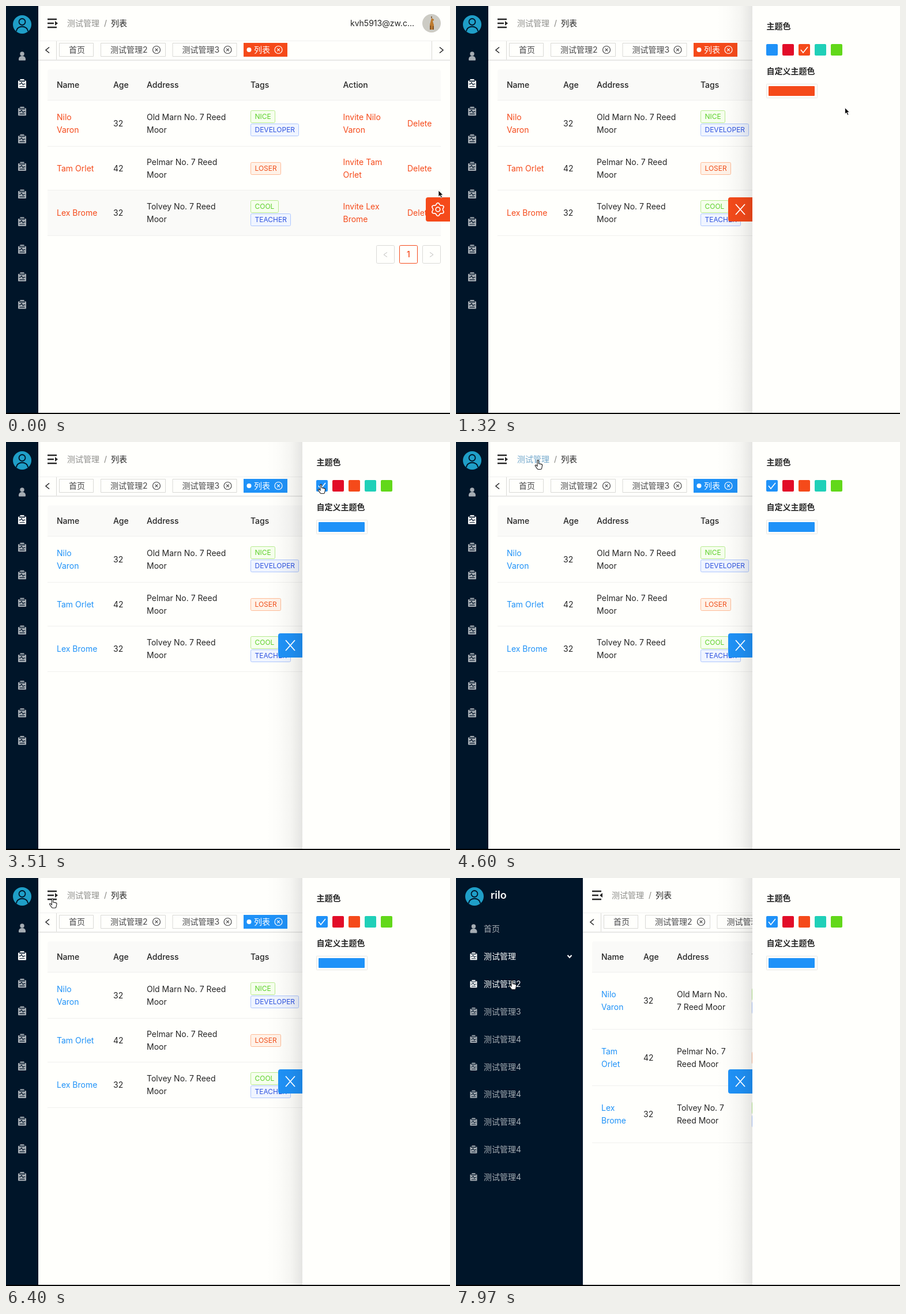
These frames come from a looping animation (770x708 px, 8000 ms). An HTML page with a canvas:

```html
<!DOCTYPE html>
<html lang="zh">
<head>
<meta charset="utf-8">
<style>
html, body { margin: 0; width: 100%; height: 100%; overflow: hidden; background: #fffffc; }
canvas { display: block; }
</style>
</head>
<body>
<canvas id="stage" width="770" height="708"></canvas>
<script>
const ctx = document.getElementById('stage').getContext('2d');
const LOOP = 8000, PAPER = '#fffffc', DARK = '#001529', INK = '#262626';
const LINE = '#f0f0ee', BORDER = '#d9d9d6', BAND = '#fafaf8';
const THEMES = ['#1f92f8', '#e20c28', '#f54a1a', '#20d0b8', '#62d81a'];

const ROWS = [
  { name: 'Nilo Varon', age: 32, address: 'Old Marn No. 7 Reed Moor', tags: ['NICE', 'DEVELOPER'] },
  { name: 'Tam Orlet', age: 42, address: 'Pelmar No. 7 Reed Moor', tags: ['LOSER'] },
  { name: 'Lex Brome', age: 32, address: 'Tolvey No. 7 Reed Moor', tags: ['COOL', 'TEACHER'] },
];
// Row heights and address wrapping for the three table widths
const ROW_HEIGHTS = [[79.5, 76.5, 78.5], [98.5, 77, 78.5], [98.5, 98.5, 98.5]];
const ADDRESS_WORDS = [[5, 4, 4], [4, 3, 3], [3, 3, 3]];
const GREEN = ['#5cd02a', '#f6ffed', '#b7eb8f'];
const BLUE = ['#2f54e0', '#f0f5ff', '#adc6ff'];
const RED = ['#f0501c', '#fff2e8', '#ffbb96'];
const TAGS = {
  NICE: [43, GREEN], DEVELOPER: [84, BLUE], LOSER: [53, RED], COOL: [49, GREEN], TEACHER: [70, BLUE],
};
const MENU = ['首页', '测试管理', '测试管理2', '测试管理3', ...Array(6).fill('测试管理4')];

// Pointer tip: time, x, y
const PATH = [
  [0, 750, 320], [350, 746, 355], [920, 746, 355], [1600, 633, 73], [2250, 633, 73],
  [2760, 546, 73], [3750, 546, 73], [4530, 146, 32], [4600, 142, 31], [4910, 122, 31],
  [5080, 122, 31], [5620, 27, 144], [5930, 27, 144], [6500, 85, 26], [7050, 85, 26],
  [7540, 97, 177], [LOOP, 97, 177],
];
const ARROW_SPANS = [[0, 180], [980, 1500], [3900, 4450], [5150, 5500], [6050, 6400]];

const clamp = v => Math.max(0, Math.min(1, v));
const lerp = (a, b, k) => a + (b - a) * k;
const ramp = (t, start, length) => clamp((t - start) / length);
const during = (t, a, b) => t >= a && t < b;
const fade = (t, a, b) => Math.min(ramp(t, a, 120), 1 - ramp(t, b, 120));

function text(str, x, y, color = INK, size = 14, weight = 400, align = 'left') {
  ctx.font = `${weight} ${size}px Inter, "Noto Sans CJK SC", "Noto Sans CJK", sans-serif`;
  ctx.fillStyle = color;
  ctx.textAlign = align;
  ctx.fillText(str, x, y + size * 0.36);
}
function rect(x, y, w, h, color) {
  ctx.fillStyle = color;
  ctx.fillRect(x, y, w, h);
}
function box(x, y, w, h, radius, fill, stroke) {
  ctx.beginPath();
  ctx.roundRect(x, y, w, h, radius);
  paint(fill, stroke);
}
function circle(x, y, r, fill, stroke, width) {
  ctx.beginPath();
  ctx.arc(x, y, r, 0, 7);
  paint(fill, stroke, width);
}
function paint(fill, stroke, width = 1) {
  if (fill) { ctx.fillStyle = fill; ctx.fill(); }
  if (stroke) { ctx.strokeStyle = stroke; ctx.lineWidth = width; ctx.stroke(); }
}
// SVG path drawn with its origin at x, y
function shape(d, x, y, fill, stroke, width = 1) {
  const path = new Path2D(d);
  ctx.save();
  ctx.translate(x, y);
  if (fill) { ctx.fillStyle = fill; ctx.fill(path); }
  if (stroke) { ctx.strokeStyle = stroke; ctx.lineWidth = width; ctx.stroke(path); }
  ctx.restore();
}
function withAlpha(alpha, draw) {
  if (alpha <= 0) return;
  ctx.save();
  ctx.globalAlpha = alpha;
  draw();
  ctx.restore();
}
function softShadow(blur, color, offset, draw) {
  ctx.save();
  Object.assign(ctx, { shadowBlur: blur, shadowColor: color, shadowOffsetY: offset });
  draw();
  ctx.restore();
}
// Two lines, broken after the given number of words
function wrapped(str, count, x, y, color) {
  const words = str.split(' ');
  const lines = [words.slice(0, count), words.slice(count)].filter(l => l.length);
  lines.forEach((l, i) => text(l.join(' '), x, y + (i - (lines.length - 1) / 2) * 22, color));
}

function userIcon(x, y, color) {
  circle(x, y - 4, 3.7, color);
  box(x - 6, y, 12, 7.5, [5, 5, 1, 1], color);
}
function clipboardIcon(x, y, color, size) {
  ctx.save();
  ctx.translate(x, y);
  ctx.scale(size / 14, size / 14);
  box(-7, -5.5, 14, 13, 1, color);
  rect(-3.5, -8, 7, 2, color);
  shape('M-5 -4.2H5M-5.5 .5H-3L-1 -2L1.5 2L3 .5H5.5M-4.5 4.6H4.5', 0, 0, null, DARK, 1.2);
  ctx.restore();
}
function closeIcon(x, color) {
  circle(x, 76, 6.5, null, color, 1.2);
  shape('M-2.4 -2.4L2.4 2.4M2.4 -2.4L-2.4 2.4', x, 76, null, color, 1.2);
}
function gearIcon(x, y) {
  ctx.beginPath();
  for (let i = 0; i <= 72; i++) {
    const a = i / 72 * Math.PI * 2, r = 9.8 + 1.5 * Math.cos(6 * (a + Math.PI / 2));
    ctx.lineTo(x + r * Math.cos(a), y + r * Math.sin(a));
  }
  paint(null, '#fff', 1.7);
  circle(x, y, 3.8, null, '#fff', 1.7);
}
function tooltip(label, x, y, w, h, up) {
  const fill = up ? '#07090c' : '#404040';
  softShadow(14, 'rgba(0,0,0,.15)', 3, () => box(x, y, w, h, 2, fill));
  shape(up ? 'M-5 0L0 -5L5 0' : 'M-5 0L0 5L5 0', x + w / 2, up ? y : y + h, fill);
  text(label, x + w / 2, y + h / 2, '#fff', 14, 400, 'center');
}

function drawHeader(w, open, theme, t) {
  const x = w + 16;
  shape('M0 1H16M0 8H11M0 15H16', x, 22, null, INK, 2.6);
  shape(open ? 'M18 4V12L13 8Z' : 'M13 4V12L18 8Z', x, 22, INK);
  text('测试管理', w + 50, 30, during(t, 4480, 5080) ? '#72a8cc' : '#8f8f8c');
  text('/', w + 114, 30, '#85857f');
  text('列表', w + 126, 30);
  text('kvh5913@zw.c...', 708, 30, INK, 14, 400, 'right');

  circle(738, 30, 16, '#cccbc4');
  shape('M-3 11V2L0 -9L4 -7V-5L2 -4L4 3V11', 738, 30, '#bd7b30');
  shape('M-2 11V4M3 11V5M0 -9V-12', 738, 30, null, '#6d4520', 1.4);

  rect(w, 60, 770 - w, 1, LINE);
  rect(w, 93, 770 - w, 2, '#e8e8e6');
  rect(w + 31, 61, 1, 32, BORDER);
  rect(738, 61, 1, 32, BORDER);
  shape('M3 -5L-3 0L3 5', w + 16, 76.5, null, INK, 1.5);
  shape('M-3 -5L3 0L-3 5', 755, 76.5, null, INK, 1.5);
  [['首页', 36, 60], ['测试管理2', 108, 113, 205], ['测试管理3', 232.5, 112, 328.5]].forEach(([label, left, width, close]) => {
    box(w + left + .5, 64.5, width - 1, 23, 0, PAPER, BORDER);
    text(label, w + left + 17, 76, '#48484a');
    if (close) closeIcon(w + close, '#48484a');
  });
  rect(w + 356, 64, 76, 24, theme);
  circle(w + 365.5, 76, 4, '#fff');
  text('列表', w + 374, 76, '#fff');
  closeIcon(w + 416.5, '#fff');
}

function drawTable(w, mode, at, theme, t) {
  const left = w + 16, width = 754 - left;
  const col = { name: w + 32, age: w + at(130, 115, 105), address: w + at(188, 173, 163), tags: w + at(368, 321, 293) };
  box(left, 110, width, 54, [4, 4, 0, 0], BAND);
  rect(left, 163, width, 1, LINE);
  [['Name', col.name], ['Age', col.age], ['Address', col.address], ['Tags', col.tags], ['Action', 584.5]]
    .forEach(([label, x]) => text(label, x, 137, INK, 14, 500));

  let top = 164;
  ROWS.forEach((row, i) => {
    const height = ROW_HEIGHTS[mode][i], mid = top + height / 2;
    if (i === 2 && t < 300) rect(left, top, width, height, BAND);
    rect(left, Math.round(top + height) - 1, width, 1, LINE);
    wrapped(row.name, mode || i === 0 ? 1 : 2, col.name, mid, theme);
    text(row.age, col.age, mid);
    wrapped(row.address, ADDRESS_WORDS[mode][i], col.address, mid);
    row.tags.forEach((tag, k) => {
      const [tagWidth, [ink, fill, edge]] = TAGS[tag];
      const y = Math.round(mid - 11 + (k - (row.tags.length - 1) / 2) * 23);
      box(Math.round(col.tags) + .5, y + .5, tagWidth - 1, 21, 2, fill, edge);
      text(tag, col.tags + 7.5, y + 11, ink, 12);
    });
    wrapped('Invite ' + row.name, 2, 584.5, mid, theme);
    text('Delete', 696, mid, theme);
    top += height;
  });

  const y = Math.round(top) + 16.5;
  [642, 682, 722].forEach((x, i) => box(x + .5, y, 31, 31, 2, PAPER, i === 1 ? theme : BORDER));
  text('1', 698, y + 15.5, theme, 14, 500, 'center');
  shape('M3 -4L-3 0L3 4', 658, y + 16, null, '#bfbfbc');
  shape('M-3 -4L3 0L-3 4', 738, y + 16, null, '#bfbfbc');
}

function drawSidebar(w, p, at, t) {
  rect(0, 0, w, 708, DARK);
  ctx.save();
  ctx.beginPath();
  ctx.rect(0, 0, w, 708);
  ctx.clip();
  const logo = at(28, 28, 32);
  circle(logo, 32, 16, '#1f9fc8');
  circle(logo, 27.5, 5.5, null, DARK, 1.8);
  shape('M-10 10C-9 -1 9 -1 10 10', logo, 34, null, DARK, 1.8);
  if (p > 0) text('rilo', logo + 28, 30, '#fff', 18, 600);

  const iconX = at(28, 41.5, 30.5), labelX = at(54, 50, 48);
  const hovered = t > 7480 ? 2 : -1;
  MENU.forEach((label, i) => {
    const y = 87 + i * 47.9 + p, color = i === 1 || i === hovered ? '#fff' : '#a6adb4';
    if (i) clipboardIcon(iconX, y, color, at(14, 12, 12));
    else userIcon(iconX, y, color);
    const cut = p < .85 && i > 0;
    withAlpha(clamp((p - .58) / .42), () => text(cut ? label.slice(0, i === 1 ? 1 : 2) : label, labelX, y, color));
    if (cut && p > .3) text('...', labelX + (i === 1 ? 14 : 28), y, color);
  });
  if (p > .3) {
    ctx.save();
    ctx.translate(at(60, 103.5, 197), 136);
    ctx.rotate(clamp((p - .7) / .3) * Math.PI / 2);
    shape('M-2 -3.5L2 0L-2 3.5', 0, 0, null, '#fff', 2);
    ctx.restore();
  }
  ctx.restore();
}

function drawDrawer(t, selected, theme) {
  const u = ramp(t, 420, 368);
  const panel = 514 + 256 * (1 - u) ** 3, handle = 472 + 256 * (1 - u) ** 2.5;
  box(handle, 332, 42, 42, [4, 0, 0, 4], theme);
  if (u === 0) return gearIcon(handle + 21, 353);

  const shade = ctx.createLinearGradient(panel - 62, 0, panel, 0);
  [0, .012, .04, .1].forEach((a, i) => shade.addColorStop(i / 3, `rgba(0,0,0,${a})`));
  rect(panel - 62, 0, 62, 708, shade);
  shape('M-8 -9L8 9M8 -9L-8 9', handle + 21, 353, null, '#fff', 1.8);
  rect(panel, 0, 770 - panel, 708, PAPER);

  text('主题色', panel + 24.5, 35, INK, 14, 700);
  THEMES.forEach((color, i) => {
    const x = panel + 24 + i * 28;
    box(x, 66, 20, 20, 2, color);
    if (i === selected) shape('M-6 0L-2 5L6 -5', x + 10, 76, null, '#fff', 1.6);
  });
  text('自定义主题色', panel + 24.5, 113, INK, 14, 700);
  box(panel + 24.5, 135.5, 88, 24, 1, PAPER, '#e6e6e2');
  box(panel + 28, 139, 80, 17, 1, theme);
}

function drawPopup(theme) {
  softShadow(16, 'rgba(0,0,0,.2)', 6, () => box(60, 116, 160, 47, 2, '#000c17'));
  rect(60, 120, 160, 39, theme);
  userIcon(82.5, 139, '#fff');
  text('列表', 100, 139, '#fff');
}

function drawPointer(t) {
  const i = PATH.findIndex(key => key[0] > t);
  const [t0, x0, y0] = PATH[i - 1], [t1, x1, y1] = PATH[i];
  const u = (t - t0) / (t1 - t0), k = u * u * (3 - 2 * u);
  const x = lerp(x0, x1, k), y = lerp(y0, y1, k);
  if (ARROW_SPANS.some(([a, b]) => during(t, a, b)))
    shape('M0 0V11L2.6 8.7L4.5 13L6.5 12L4.6 8H8Z', x, y, '#111', '#fff', .8);
  else
    shape('M-1 1.5C-1 0 1.4 0 1.4 1.5V6.5L6 7.4C7.4 7.7 7.8 8.6 7.6 10L6.8 14C6.6 15.4 6 16.5 4.8 16.5H1C0 16.5 -.7 16 -1.2 15.4L-4.6 10.5C-5.4 9.3 -4 8.4 -3 9.2L-1 11Z', x, y, '#fff', '#222', 1.1);
}

function render(t) {
  const p = 1 - (1 - ramp(t, 6830, 293)) ** 2;
  const w = Math.round(56 + 164 * p), middle = 107 / 164;
  // Value at the closed, half-open and open sidebar
  const at = (a, b, c) => p < middle ? lerp(a, b, p / middle) : lerp(b, c, (p - middle) / (1 - middle));
  const mode = w < 110 ? 0 : w < 190 ? 1 : 2;
  const selected = t < 1970 ? 2 : t < 3100 ? 3 : 0, theme = THEMES[selected];

  rect(0, 0, 770, 708, PAPER);
  drawHeader(w, p > 0, theme, t);
  drawTable(w, mode, at, theme, t);
  drawSidebar(w, p, at, t);
  drawDrawer(t, selected, theme);
  withAlpha(fade(t, 5500, 6150), () => drawPopup(theme));
  withAlpha(fade(t, 1660, 2330), () => tooltip('明青', 610, 20, 44, 34, false));
  withAlpha(fade(t, 6830, 7130), () => tooltip('收起', 60, 52, 43, 32, true));
  if (during(t, 500, 800)) circle(746, 356, 4.5, null, '#f08050', 1.3);
  drawPointer(t);
  rect(0, 706, 770, 2, '#000');
}

function frame() {
  render(performance.now() % LOOP);
  requestAnimationFrame(frame);
}
frame();
</script>
</body>
</html>
```
